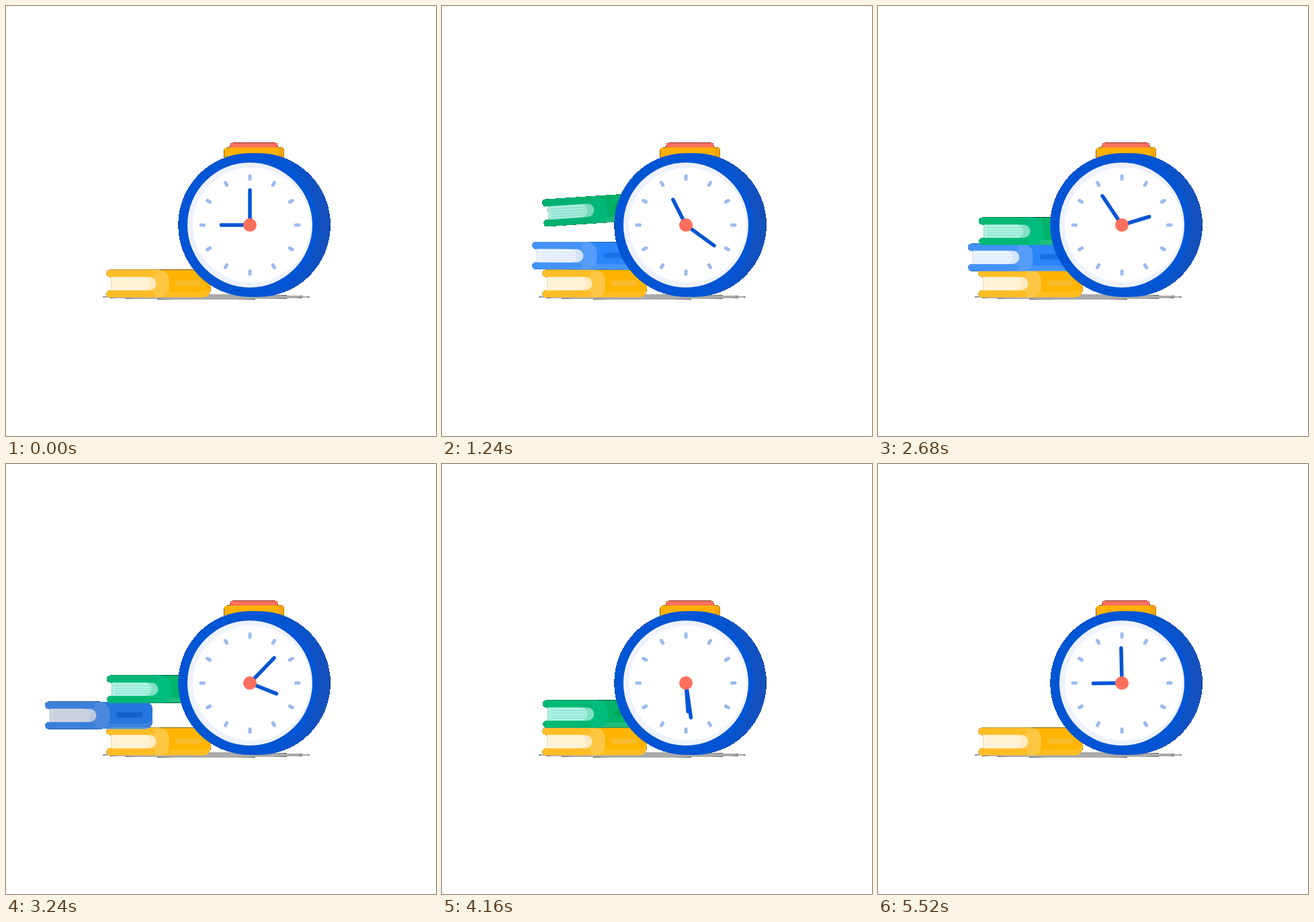
An HTML page for the animation above (5.56 s loop, 640x640 px).

```html
<!DOCTYPE html>
<html lang="en">
<head>
<meta charset="utf-8">
<title>Clock and books</title>
<style>
html, body { margin: 0; height: 100%; overflow: hidden; background: #fff; }
svg { display: block; width: 100vw; height: 100vh; }
</style>
</head>
<body>
<svg viewBox="0 0 640 640">
  <defs>
    <!-- One-bit alpha: half-transparent pixels turn dark, fainter ones vanish -->
    <filter id="matte" filterUnits="userSpaceOnUse" x="0" y="0" width="640" height="640" color-interpolation-filters="sRGB">
      <feComponentTransfer in="SourceAlpha" result="mask">
        <feFuncA type="discrete" tableValues="0 1"/>
      </feComponentTransfer>
      <feComposite in="SourceGraphic" in2="mask" operator="in" result="art"/>
      <feMerge><feMergeNode in="mask"/><feMergeNode in="art"/></feMerge>
    </filter>
    <linearGradient id="rim" gradientUnits="userSpaceOnUse" x1="400" x2="483" y1="0" y2="0">
      <stop offset="0" stop-color="#0055d4"/>
      <stop offset=".6" stop-color="#0d51c6"/>
      <stop offset="1" stop-color="#1550ba"/>
    </linearGradient>
  </defs>
  <g filter="url(#matte)">
    <ellipse cx="298" cy="433" rx="155" ry="4" fill="#aaa"/>
    <g id="books"></g>
    <path d="M333.450 212V207q0-3.550 3.500-3.550h64q3.600 0 3.600 3.550v5z" fill="#ff6f5e"/>
    <path d="M324.450 230V214.500q0-4.050 4-4.050h81q4.100 0 4.100 4.050V230z" fill="#ffb000"/>
    <path d="M402 210.450h7.450q4.100 0 4.100 4.050V230H406V214.500q0-4-4-4.050z" fill="#f2a40c"/>
    <path d="M363.300 219h12.700a107 107 0 0 1 0 214h-12.700a107 107 0 0 1 0-214z" fill="url(#rim)"/>
    <ellipse cx="360" cy="326" rx="103.500" ry="106" fill="#0055d4"/>
    <circle cx="363" cy="326" r="93" fill="#edf2fd"/>
    <ellipse cx="365.500" cy="326" rx="87.500" ry="85.500" fill="#fff"/>
    <g id="ticks" stroke="#99bbf3" stroke-width="5" stroke-linecap="round"></g>
    <g stroke="#0055d4" stroke-width="5.500" stroke-linecap="round">
      <path id="minute" d="M363 326V274"/>
      <path id="hour" d="M363 326V283.500"/>
    </g>
    <circle cx="363" cy="326" r="10" fill="#ff6f5e"/>
  </g>
</svg>
<script>
const LOOP = 5560, STEP = 40;
const $ = id => document.getElementById(id);
const clamp = x => Math.min(1, Math.max(0, x));
const ease = (t, start, span) => {
  const s = clamp((t - start) / span);
  return s * s * (3 - 2 * s);
};

const book = (id, c) => `<g id="${id}">
  <path d="M5 0H146Q160 0 160 14V28Q160 41.100 146 41.100H5A5.300 5.300 0 0 1 5 30.500H7V11H5A5.500 5.500 0 0 1 5 0z" fill="${c.base}"/>
  <path d="M80 33H146Q156 31 159.500 27V30Q159 41.100 146 41.100H80z" fill="#fff" opacity=".12"/>
  <path d="M5 0H80Q96 2 96 17V25Q96 39 82 41.100H5A5.300 5.300 0 0 1 5 30.500H7V11H5A5.500 5.500 0 0 1 5 0z" fill="${c.light}"/>
  <path d="M5 5.500H70M5 36H70" stroke="${c.base}" stroke-width="9" stroke-linecap="round" opacity=".45"/>
  <path d="M7 11H66a10 9.750 0 0 1 0 19.500H7z" fill="${c.tip}"/>
  <path d="M7 11H58q8 2 8 9.750t-8 9.750H7z" fill="${c.page}"/>
  <path d="M12 15.500H66M12 19.500H70M12 23.500H70M12 27H66" stroke="${c.line}"/>
  <rect x="106" y="16" width="39" height="8" rx="4" fill="${c.label}"/>
</g>`;

$('books').innerHTML =
  book('yellow', {base: '#ffb400', light: '#ffc644', tip: '#ffebc0', page: '#fff4da', line: '#ffedc6', label: '#fabc2c'}) +
  book('blue', {base: '#2b86fb', light: '#569cf9', tip: '#d5e4fd', page: '#ebf2fe', line: '#d6e4fc', label: '#1870e9'}) +
  book('green', {base: '#00b469', light: '#00bd7e', tip: '#80dfc3', page: '#b0f2e3', line: '#7ce1c7', label: '#00a657'});
$('yellow').setAttribute('transform', 'translate(149.700 392.450) scale(.97 1)');

for (let a = 0; a < 360; a += 30)
  $('ticks').innerHTML += `<path d="M363 253V257.500" transform="rotate(${a} 363 326)"/>`;

// Hands: speed ramps up, stays constant, then ramps down
function turn(t) {
  const up = [160, 345], down = [5470, 90];
  const v = 1 / (down[0] + down[1] / 2 - up[0] - up[1] / 2);
  const p = Math.min(Math.max(0, t - up[0]), up[1]);
  const q = Math.max(0, t - down[0]);
  return v * (p * p / (2 * up[1]) + Math.max(0, t - up[0] - up[1]) - q * q / (2 * down[1]));
}

function place(id, x, y, angle, opacity) {
  $(id).setAttribute('opacity', opacity);
  $(id).setAttribute('transform', `translate(${x} ${y}) rotate(${angle} 80 21)`);
}

const fade = (t, appear, leave) =>
  Math.min(clamp((t - appear) / 400), clamp(1 - (t - leave) / 850));

function draw(t) {
  const u = turn(t);
  $('minute').setAttribute('transform', `rotate(${720 * u} 363 326)`);
  $('hour').setAttribute('transform', `rotate(${270 + 360 * u} 363 326)`);

  const blueUp = 1 - ease(t, 440, 920);
  place('blue', 134.45 - 152 * ease(t, 2760, 960), 353.45 - 50 * blueUp, 8 * blueUp,
    fade(t, 440, 3140));

  const greenUp = 1 - ease(t, 851, 960);
  place('green', 150.45 - 160 * ease(t, 4472, 720),
    314.45 - 50 * greenUp + 37 * ease(t, 3350, 440), -6 * greenUp,
    fade(t, 851, 4750));
}

const begin = performance.now();
function frame() {
  const t = (performance.now() - begin) % LOOP;
  draw(Math.floor(t / STEP) * STEP);
  requestAnimationFrame(frame);
}
frame();
</script>
</body>
</html>
```
